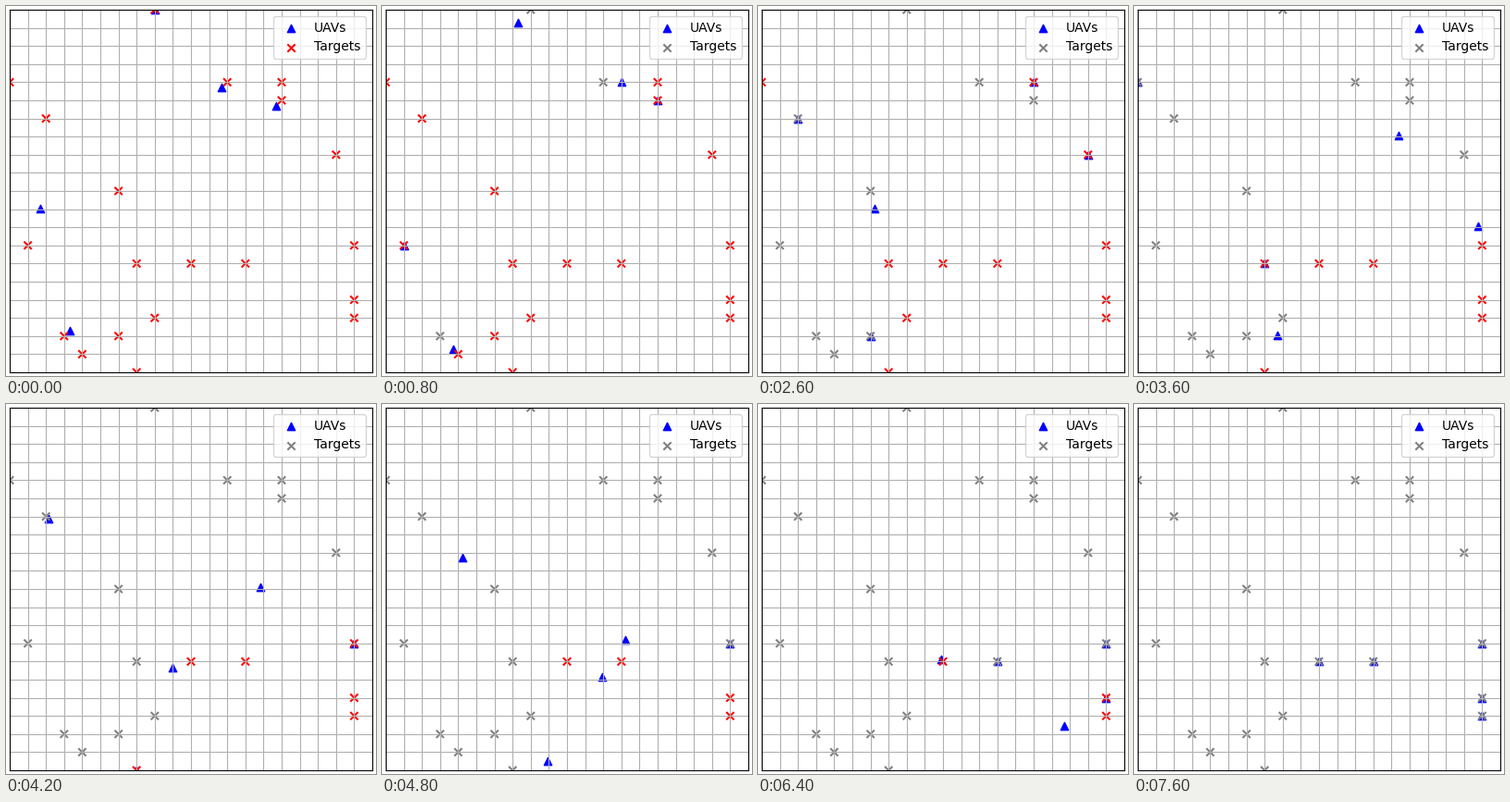
Animation, 400 px wide and 400 px high, one loop 9800 ms. Source, as a matplotlib script:

```python
import math

import matplotlib.pyplot as plt
from matplotlib.animation import FuncAnimation

SIZE = 20       # grid cells per side
FRAMES = 49
INTERVAL = 200  # ms

# Per UAV: start cell, then stops as (x, y, frames spent there)
ROUTES = [
    ((8, 19), [(8, 20, 3), (2, 14, 1), (0, 16, 2), (10, 6, 3)]),
    ((2, 10), [(1, 7, 2), (6, 10, 1), (7, 6, 2), (19, 4, 2)]),
    ((4, 3), [(3, 2, 2), (4, 1, 2), (6, 2, 3), (8, 3, 1), (7, 0, 1), (19, 3, 3)]),
    ((11, 15), [(12, 16, 2), (15, 16, 9), (13, 6, 3)]),
    ((14, 14), [(15, 15, 4), (18, 12, 4), (19, 7, 2)]),
]


def fly(start, stops):
    """Return the position in every frame and the frame each stop is finished."""
    path, finished = [], []
    x, y = start
    for stop_x, stop_y, dwell in stops:
        dist = math.hypot(stop_x - x, stop_y - y)
        for step in range(1, math.ceil(dist) + 1):
            part = min(step / dist, 1)
            path.append((x + (stop_x - x) * part, y + (stop_y - y) * part))
        path += [(stop_x, stop_y)] * dwell
        finished.append(len(path) - 1)
        x, y = stop_x, stop_y
    path += [(x, y)] * (FRAMES - len(path))
    return path, finished


paths, goals, done_at = [], [], []
for start, stops in ROUTES:
    path, finished = fly(start, stops)
    paths.append(path)
    goals += [(x, y) for x, y, _ in stops]
    done_at += finished

fig, ax = plt.subplots(figsize=(4, 4), dpi=100)
fig.subplots_adjust(left=0.01, right=0.99, bottom=0.01, top=0.99)
ax.set_xlim(0, SIZE)
ax.set_ylim(0, SIZE)
ax.set_xticks(range(SIZE + 1))
ax.set_yticks(range(SIZE + 1))
ax.tick_params(length=0, labelbottom=False, labelleft=False)
ax.grid(True)

uavs = ax.scatter(*zip(*[p[0] for p in paths]), c="blue", marker="^", label="UAVs")
crosses = ax.scatter(*zip(*goals), c="red", marker="x", label="Targets")
legend = ax.legend(loc="upper right")


def update(frame):
    uavs.set_offsets([p[frame] for p in paths])
    colors = ["gray" if frame >= done else "red" for done in done_at]
    crosses.set_color(colors)
    # The legend cross follows the first goal
    legend.legend_handles[1].set_color(colors[0])
    return uavs, crosses, legend


anim = FuncAnimation(fig, update, frames=FRAMES, interval=INTERVAL,
                     repeat=True, repeat_delay=0)
plt.show()
```
